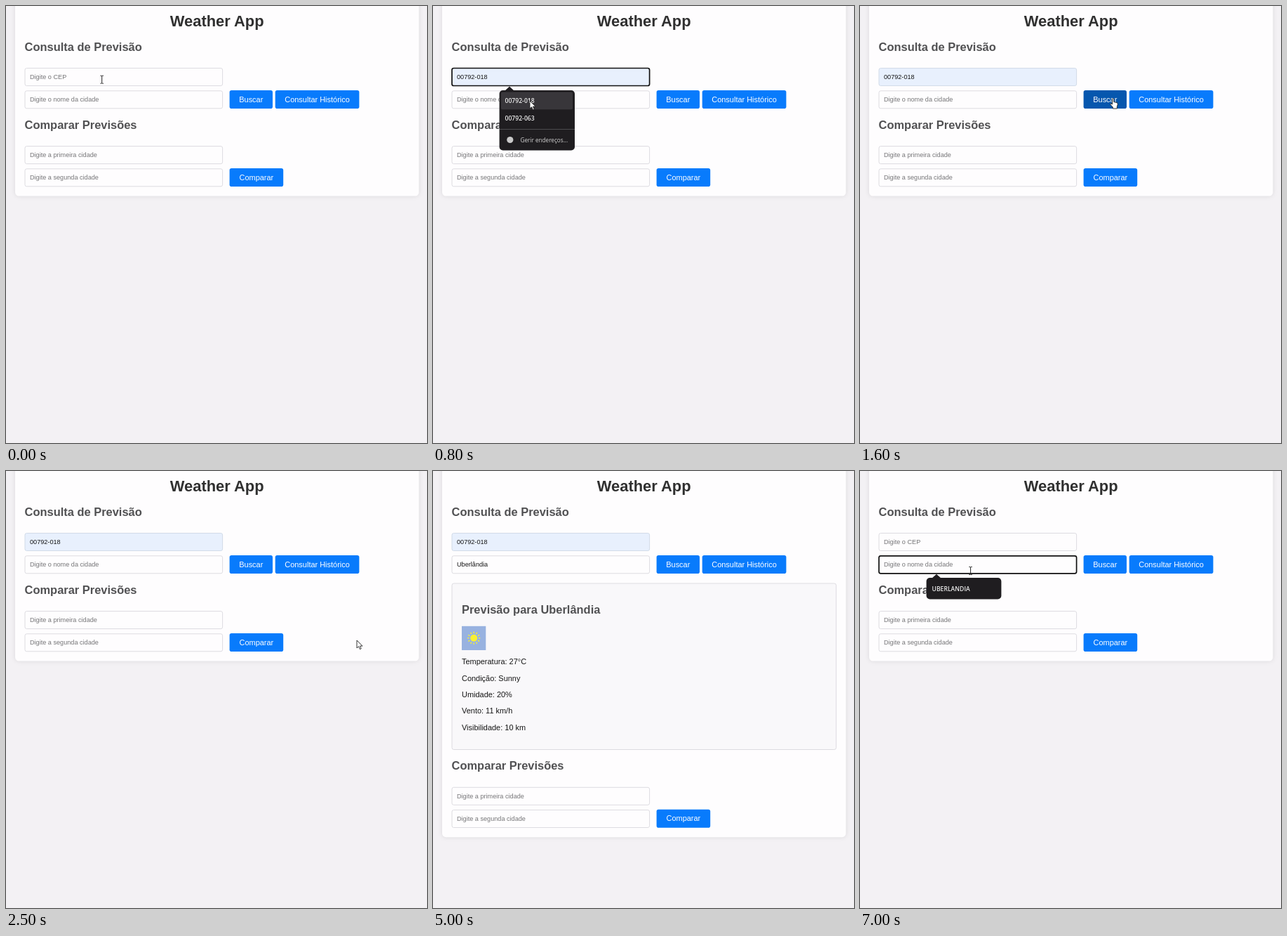
An HTML page for the animation above (8000 ms loop, 600 by 622 pixels).

```html
<!DOCTYPE html>
<html lang="pt">
<head>
<meta charset="utf-8">
<title>Weather App</title>
<style>
  html, body { margin: 0; width: 100%; height: 100%; overflow: hidden; background: #f3f1f4; }
  svg { display: block; width: 600px; height: 622px; }
  text { font-family: "Liberation Sans", Arial, sans-serif; font-size: 10.96px; fill: #151515; }
  .title { font-size: 21.9px; font-weight: bold; fill: #303030; text-anchor: middle; }
  .heading { font-size: 16.44px; font-weight: bold; fill: #515153; }
  .entry { font-size: 9.13px; }
  .empty { fill: #757577; }
  .label { fill: #fff; text-anchor: middle; }
  .menu text { font: 600 8.65px "Open Sans", "Noto Sans", sans-serif; fill: #ececec; }
  .menu .action { font-size: 8.2px; font-weight: 400; fill: #d2d2d2; }
  .card { fill: #fefdfe; filter: drop-shadow(0 0 3.4px rgba(0, 0, 0, .1)); }
  .field { fill: #fefdfe; stroke: #dad9de; stroke-width: .9; }
  .filled { fill: #e8f0fd; stroke: #cfd8e6; }
  .focus { stroke: #111; stroke-width: 1.7; }
</style>
</head>
<body>
<svg viewBox="0 0 600 622">
  <rect width="600" height="622" fill="#f3f1f4"/>
  <rect id="card" class="card" x="13" y="-10" width="575.5" height="280.5" rx="5.5"/>
  <text class="title" x="300.7" y="29.4">Weather App</text>
  <text class="heading" x="26.6" y="63.8">Consulta de Previsão</text>
  <g id="search"></g>
  <g id="result">
    <rect x="27" y="160" width="547.6" height="236.5" rx="2.8" fill="#f9f8fa" stroke="#dad9de" stroke-width=".9"/>
    <text class="heading" x="41" y="202.9">Previsão para Uberlândia</text>
    <rect x="41" y="220.8" width="34.3" height="34.2" fill="#98b2e0"/>
    <g id="sun" transform="translate(58.2 237.8)" stroke="#f8f033" stroke-width="1.5" stroke-linecap="round">
      <circle r="5" fill="#f8f033" stroke="none"/>
    </g>
  </g>
  <g id="compare">
    <text class="heading" x="26.6" y="174.8">Comparar Previsões</text>
  </g>
  <g id="codeMenu" class="menu">
    <path d="M102 121L109 114.5L116 121Z" fill="#1f1d20"/>
    <rect x="94.6" y="120" width="107.4" height="85.5" rx="5" fill="#1f1d20"/>
    <rect id="option" x="97" y="122.5" width="102" height="24.8" rx="2" fill="#38363a"/>
    <text x="102.5" y="138.4">00792-018</text>
    <text x="102.5" y="163.2">00792-063</text>
    <path d="M95 175.5H202" stroke="#59575a" stroke-width=".8"/>
    <circle cx="109.8" cy="190.5" r="4.6" fill="#c9c9c9"/>
    <text class="action" x="124.5" y="193.8">Gerir endereços...</text>
  </g>
  <g id="cityMenu" class="menu">
    <path d="M102 153L109 146.8L116 153Z" fill="#1f1d20"/>
    <rect x="94.6" y="152" width="106.8" height="30.4" rx="5" fill="#1f1d20"/>
    <text x="102.5" y="170.6">UBERLANDIA</text>
  </g>
  <g id="pointer">
    <path id="arrow" d="M0 0V11L2.6 8.7L4.4 12.7L6.2 11.9L4.5 8.1H8Z" fill="#fff" stroke="#222" stroke-width=".9" stroke-linejoin="round"/>
    <path id="beam" d="M-2.2 -5.5H-.6L0 -5L.6 -5.5H2.2M0 -5V5M-2.2 5.5H-.6L0 5L.6 5.5H2.2" fill="none" stroke="#222"/>
    <path id="hand" d="M0 .8Q1.1 -.5 2.2 .8V5L6.5 6Q8 6.5 7.8 8.5L6.8 12V14.5H.8V12.5L-2.8 8.6Q-2.6 6.8 -1 7.6L0 8.6Z" fill="#fff" stroke="#222" stroke-width=".9" stroke-linejoin="round"/>
  </g>
</svg>
<script>
const DURATION = 8000;
const byId = id => document.getElementById(id);

function add(parent, tag, attrs, text = "") {
  const node = document.createElementNS("http://www.w3.org/2000/svg", tag);
  for (const key in attrs) node.setAttribute(key, attrs[key]);
  node.textContent = text;
  return parent.appendChild(node);
}

function addField(parent, y, hint) {
  const box = add(parent, "rect", { x: 27, y, width: 281.6, height: 25, rx: 2.5 });
  const text = add(parent, "text", { x: 34, y: y + 15.6 });
  return (value = "", look = "") => {
    box.setAttribute("class", "field " + look);
    text.setAttribute("class", value ? "entry" : "entry empty");
    text.textContent = value || hint;
  };
}

function addButton(parent, x, y, width, label) {
  const box = add(parent, "rect", { x, y, width, height: 26, rx: 2.8 });
  add(parent, "text", { class: "label", x: x + width / 2, y: y + 16.6 }, label);
  return hover => box.setAttribute("fill", `rgb(${8 - 2 * hover} ${123 - 36 * hover} ${252 - 78 * hover})`);
}

const search = byId("search"), compare = byId("compare");
const codeField = addField(search, 88.5, "Digite o CEP");
const cityField = addField(search, 120.8, "Digite o nome da cidade");
const searchButton = addButton(search, 318.6, 120, 61.4, "Buscar");
addButton(search, 383.7, 120, 119.7, "Consultar Histórico")(0);
addField(compare, 199.6, "Digite a primeira cidade")();
addField(compare, 231.8, "Digite a segunda cidade")();
const compareButton = addButton(compare, 318.6, 231, 76.6, "Comparar");

["Temperatura: 27°C", "Condição: Sunny", "Umidade: 20%", "Vento: 11 km/h", "Visibilidade: 10 km"]
  .forEach((line, i) => add(byId("result"), "text", { x: 41, y: 275.3 + i * 23.3 }, line));
for (let i = 0; i < 12; i++) add(byId("sun"), "path", { d: "M0 -7.4V-8.5", transform: `rotate(${i * 30})` });

// Every table row starts with the time in ms at which it takes effect.
const pointerSteps = [
  [0, "beam", 136.7, 104.7], [400, "beam", 137, 112], [500, "arrow", 138, 124], [600, "arrow", 138, 132],
  [700, "arrow", 138, 135], [1000, "beam", 165, 137], [1100, "beam", 250, 136], [1200, "hand", 335, 132],
  [1300, "hand", 359.5, 131.5], [1700, "arrow", 390, 152], [1800, "arrow", 455, 195],
  [1900, "arrow", 510, 230], [2000, "arrow", 526, 239], [2500, "arrow", 500, 241],
  [2600, "arrow", 425, 243], [2700, "hand", 365, 237], [2800, "arrow", 351.7, 220.9],
  [3700, "arrow", 330, 217], [3800, "arrow", 235, 208], [3900, "arrow", 100, 196], [4000, "", 0, 0],
  [5800, "arrow", 40, 85], [5900, "arrow", 85, 102], [6000, "arrow", 130, 125],
  [6100, "arrow", 157, 142], [6200, "arrow", 167, 149], [6600, "beam", 157.6, 142]
];
const searchHover = [[0, 0], [1200, .4], [1300, 1], [1700, .8], [1800, .4], [1900, .1], [2000, 0]];
const compareHover = [[0, 0], [2700, .4], [2800, .7], [3000, 0]];

const current = (steps, t) => steps.findLast(step => step[0] <= t);
const show = (id, on) => byId(id).setAttribute("visibility", on ? "visible" : "hidden");

function render(t) {
  const within = (from, to) => t >= from && t < to;
  const hasCode = within(600, 5400), hasResult = within(3200, 5400);

  codeField(hasCode ? "00792-018" : "", (hasCode ? "filled " : "") + (within(100, 1600) ? "focus" : ""));
  cityField(hasResult ? "Uberlândia" : "", t >= 6700 ? "focus" : "");
  show("codeMenu", within(200, 1000));
  show("option", within(600, 1000));
  show("cityMenu", t >= 6800);
  show("result", hasResult);

  const shift = hasResult ? 250.7 : 0;
  compare.setAttribute("transform", `translate(0 ${shift})`);
  byId("card").setAttribute("height", 280.5 + shift);
  searchButton(current(searchHover, t)[1]);
  compareButton(current(compareHover, t)[1]);

  const [, shape, x, y] = current(pointerSteps, t);
  byId("pointer").setAttribute("transform", `translate(${x} ${y})`);
  for (const id of ["arrow", "beam", "hand"]) show(id, id === shape);
}

const start = performance.now();
let shown = -1;
function tick() {
  const t = Math.floor(((performance.now() - start) % DURATION) / 100) * 100;
  if (t !== shown) render(shown = t);
  requestAnimationFrame(tick);
}
tick();
</script>
</body>
</html>
```
